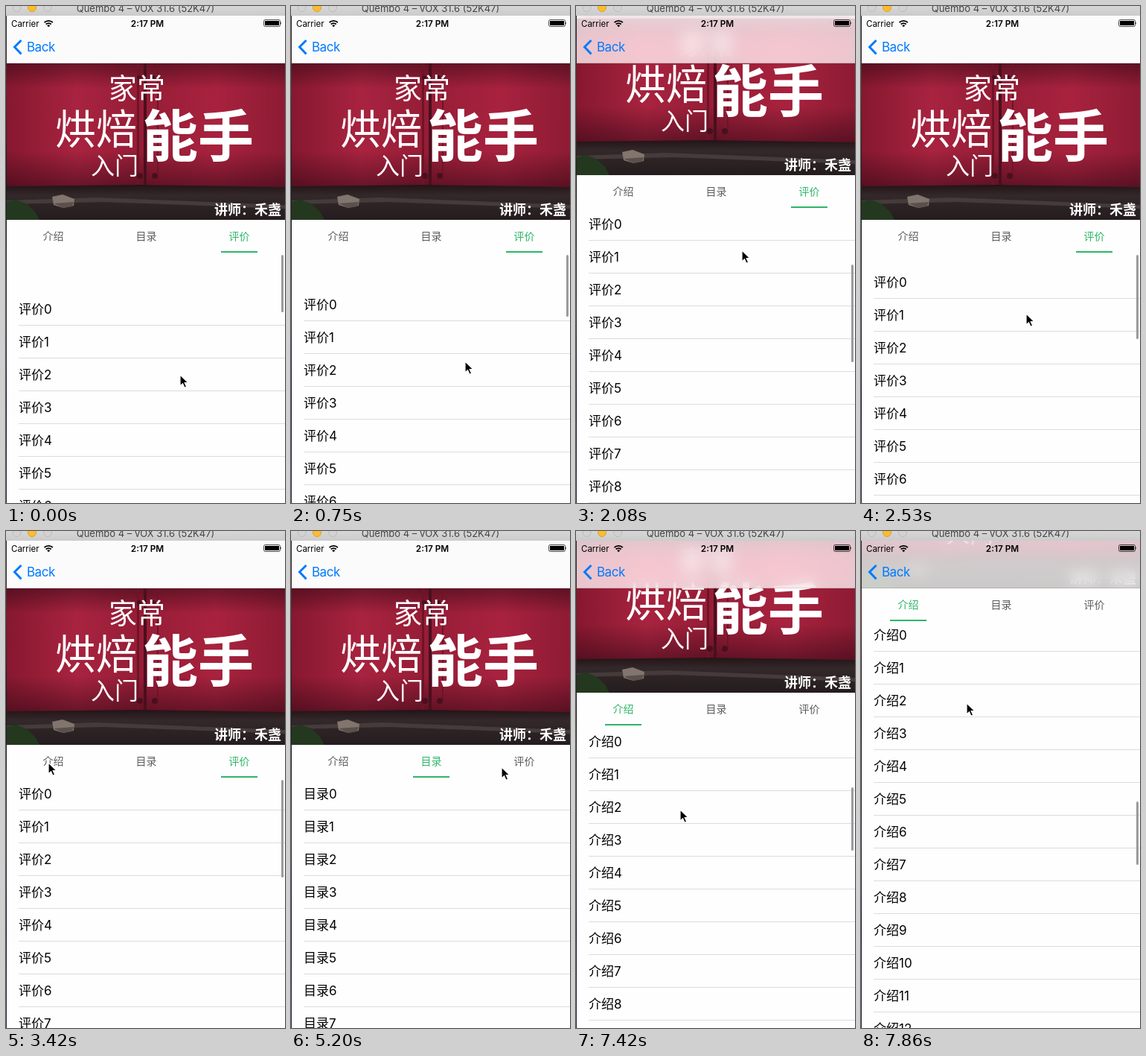
Write an HTML page that moves like this. It is 375 by 667 pixels and loops after 8 s.

```html
<!DOCTYPE html>
<html lang="zh">
<head>
<meta charset="utf-8">
<style>
html, body { margin: 0; width: 100%; height: 100%; overflow: hidden; background: #fefefe; }
body { font-family: Inter, "Noto Sans CJK SC", sans-serif; color: #000; }
div, svg, span { position: absolute; white-space: nowrap; }
#stage { left: 0; top: 0; width: 375px; height: 667px; overflow: hidden; background: #fefefe; }
#edge { left: 0; top: 13px; width: 1px; height: 654px;
  background: linear-gradient(#262b33, #5a2a30 15%, #17181c 35%, #2b3038 60%, #141a2c 80%, #2c3040); }
#list, #head { left: 1px; top: 0; width: 375px; }
.row { left: 16px; width: 359px; height: 43px; line-height: 44px; font-size: 17px; border-bottom: 1px solid #dcdcdf; }
#tabs { top: 287px; width: 375px; height: 44px; background: #fefefe; }
.tab { width: 125px; text-align: center; font-size: 14px; line-height: 44px; color: #5c5c5c; }
.tab.on { color: #2fb568; }
#line { top: 42px; width: 49px; height: 2px; background: #2fb568; }
#photo { left: 0; top: 77px; }
#photo text { fill: #fff; font-weight: 500; }
#nav { left: 1px; top: 13px; width: 374px; height: 64px; background: rgba(250,250,250,.78);
  backdrop-filter: saturate(1.6) blur(9px); border-bottom: 1px solid rgba(0,0,0,.12); box-sizing: border-box; }
#bar { left: 370px; width: 3px; border-radius: 2px; background: #9b9b9d; }
#title { left: 0; top: 0; width: 375px; height: 13px; overflow: hidden; background: linear-gradient(#d6d6d6, #cbcbcb); }
#title span { left: 0; width: 375px; top: -7px; text-align: center; font-size: 13px; line-height: 20px; color: #454545; }
</style>
</head>
<body>
<div id="stage">
  <div id="list"></div>
  <div id="head">
    <svg id="photo" width="375" height="210">
      <defs>
        <linearGradient id="wall"><stop offset="0" stop-color="#86182f"/><stop offset=".25" stop-color="#a8233f"/>
          <stop offset=".48" stop-color="#961d36"/><stop offset=".75" stop-color="#a8223e"/><stop offset="1" stop-color="#8d1b33"/></linearGradient>
        <linearGradient id="shade" x2="0" y2="1"><stop offset="0" stop-color="#200510" stop-opacity=".45"/>
          <stop offset=".2" stop-color="#200510" stop-opacity="0"/><stop offset=".7" stop-color="#200510" stop-opacity="0"/>
          <stop offset="1" stop-color="#200510" stop-opacity=".5"/></linearGradient>
        <linearGradient id="ground" x2="0" y2="1"><stop offset="0" stop-color="#231417"/><stop offset=".3" stop-color="#33282a"/>
          <stop offset="1" stop-color="#241c1e"/></linearGradient>
      </defs>
      <path fill="url(#wall)" d="M0 0h375v210H0z"/>
      <path fill="url(#shade)" d="M0 0h375v168H0z"/>
      <path fill="#4a0f1e" d="M184 0h4v165h-4z"/>
      <path fill="#6d1428" d="M175 0h3v165h-3zM202 0h2v165h-2z"/>
      <g fill="#4a0f1e"><circle cx="178" cy="19" r="3"/><circle cx="197" cy="19" r="3"/><circle cx="179" cy="151" r="4"/><circle cx="199" cy="151" r="4"/></g>
      <path fill="url(#ground)" d="M0 165 180 163 375 166v44H0z"/>
      <path fill="#463b3b" d="M0 184 120 180 375 190v5L130 186 0 189z"/>
      <path fill="#24381f" d="M0 186 12 183 26 188 38 199 44 210H0z"/>
      <path fill="#81756d" d="M61 179 75 176 91 182 90 191 76 194 63 190z"/>
      <path fill="#5b504b" d="M63 188 90 186 88 192 76 194z"/>
      <text x="137" y="46.5" font-size="38">家常</text>
      <text x="65" y="108" font-size="55">烘焙</text>
      <text x="182" y="125" font-size="75" style="font-weight:700">能手</text>
      <text x="113" y="149" font-size="32">入门</text>
      <text x="279" y="203" font-size="18" style="font-weight:700">讲师：禾盏</text>
    </svg>
    <div id="tabs"><div id="line"></div></div>
  </div>
  <div id="nav"></div>
  <svg width="375" height="80" style="left:0;top:0">
    <text x="7" y="27.5" font-size="11.5">Carrier</text>
    <text x="190" y="27.5" font-size="11.8" font-weight="600" text-anchor="middle">2:17 PM</text>
    <g fill="none" stroke="#000" stroke-width="1.8">
      <path d="M51.5 22.2a8 8 0 0 1 11.4 0M53.7 24.5a4.9 4.9 0 0 1 7 0"/>
    </g>
    <path d="M57.2 28.3l-2-2.1a2.8 2.8 0 0 1 4 0z"/>
    <rect x="346.5" y="18.5" width="22" height="9" rx="2" fill="none" stroke="#000" stroke-width=".7"/>
    <path d="M348 20h19v6h-19zM369.3 21.3q1.7 1.7 0 3.4z"/>
    <path d="M20.5 46 11.5 55l9 9.5" fill="none" stroke="#007aff" stroke-width="3"/>
    <text x="28" y="61" font-size="17" letter-spacing="-.5" fill="#007aff">Back</text>
  </svg>
  <div id="bar"></div>
  <div id="title">
    <svg width="70" height="13" style="left:0;top:0" stroke-width="1">
      <circle cx="14.5" cy="2" r="5.5" fill="#d2d2d2" stroke="#bcbcbc"/>
      <circle cx="35" cy="2" r="5.5" fill="#fdbc2f" stroke="#e0a02a"/>
      <circle cx="56" cy="2" r="5.5" fill="#d2d2d2" stroke="#bcbcbc"/>
    </svg>
    <span>Quembo 4 – vOX 31.6 (52K47)</span>
  </div>
  <div id="edge"></div>
  <svg id="mouse" width="16" height="22" viewBox="-2 -2 16 22" style="left:-2px;top:-2px">
    <path d="M0 0v15l3.5-3.3 2.5 5.5 2.6-1.1-2.4-5.4h4.9z" stroke="#fff" stroke-width="1.2"/>
  </svg>
</div>
<script>
const $ = id => document.getElementById(id);
const LOOP = 8000, STEPS = 54, HEADER = 210;
const names = ['介绍', '目录', '评价'];

// [step, list offset]: positive is pulled down, negative is scrolled up
const scroll = [[0, 54], [3, 66], [8, 20], [9, 4], [10, -6], [12, -36], [14, -60], [15, -20], [16, 28],
  [17, 18], [18, 6], [19, 6], [20, 2], [21, 0], [48, 0], [49, -20], [50, -70], [51, -130], [52, -185], [53, -213]];
// [step, x, y]
const pointer = [[0, 234, 495], [3, 234, 515], [8, 233, 419], [9, 233, 387], [14, 223, 328], [16, 222, 435],
  [18, 222, 391], [19, 222, 391], [23, 57, 311], [25, 57, 313], [30, 182, 314], [32, 182, 314], [35, 283, 317],
  [36, 306, 316], [38, 306, 316], [42, 58, 313], [44, 58, 313], [46, 109, 388], [47, 138, 443], [48, 138, 443],
  [49, 139, 424], [50, 140, 374], [51, 141, 314], [52, 142, 259], [53, 142, 231]];
// [step, selected tab]
const picks = [[0, 2], [25, 0], [31, 1], [37, 2], [44, 0]];

function at(keys, n, i = 1) {
  const k = keys.findIndex(key => key[0] >= n);
  if (k < 0) return keys[keys.length - 1][i];
  if (k === 0) return keys[0][i];
  const a = keys[k - 1], b = keys[k];
  return a[i] + (b[i] - a[i]) * (n - a[0]) / (b[0] - a[0]);
}

function add(parent, cls, style) {
  const el = document.createElement('div');
  el.className = cls;
  Object.assign(el.style, style);
  return parent.appendChild(el);
}

const tabs = names.map((name, i) => {
  const el = add($('tabs'), 'tab', { left: i * 125 + 'px' });
  el.textContent = name;
  return el;
});
const rows = Array.from({ length: 16 }, (_, i) => add($('list'), 'row', { top: 331 + i * 44 + 'px' }));
const move = (el, x, y) => el.style.transform = `translate(${x}px, ${y}px)`;

let shown = -1;
function select(tab) {
  if (tab === shown) return;
  shown = tab;
  tabs.forEach((el, i) => el.classList.toggle('on', i === tab));
  $('line').style.left = 38 + tab * 125 + 'px';
  rows.forEach((el, i) => el.textContent = names[tab] + i);
}

function draw(now) {
  const n = Math.floor(now % LOOP / LOOP * STEPS);
  const y = Math.round(at(scroll, n)), up = Math.max(0, -y);
  select(picks.filter(p => p[0] <= n).pop()[1]);
  move($('list'), 0, y);
  move($('head'), 0, -Math.min(HEADER, up));
  move($('mouse'), Math.round(at(pointer, n)), Math.round(at(pointer, n, 2)));

  const [size, rate] = shown === 2 ? [131, .217] : [85, .136];
  const bar = $('bar').style;
  bar.display = n < 25 || n > 48 ? '' : 'none';
  bar.top = 334 + up * rate + 'px';
  bar.height = size - Math.max(0, y) + 'px';
  requestAnimationFrame(draw);
}
requestAnimationFrame(draw);
</script>
</body>
</html>
```
